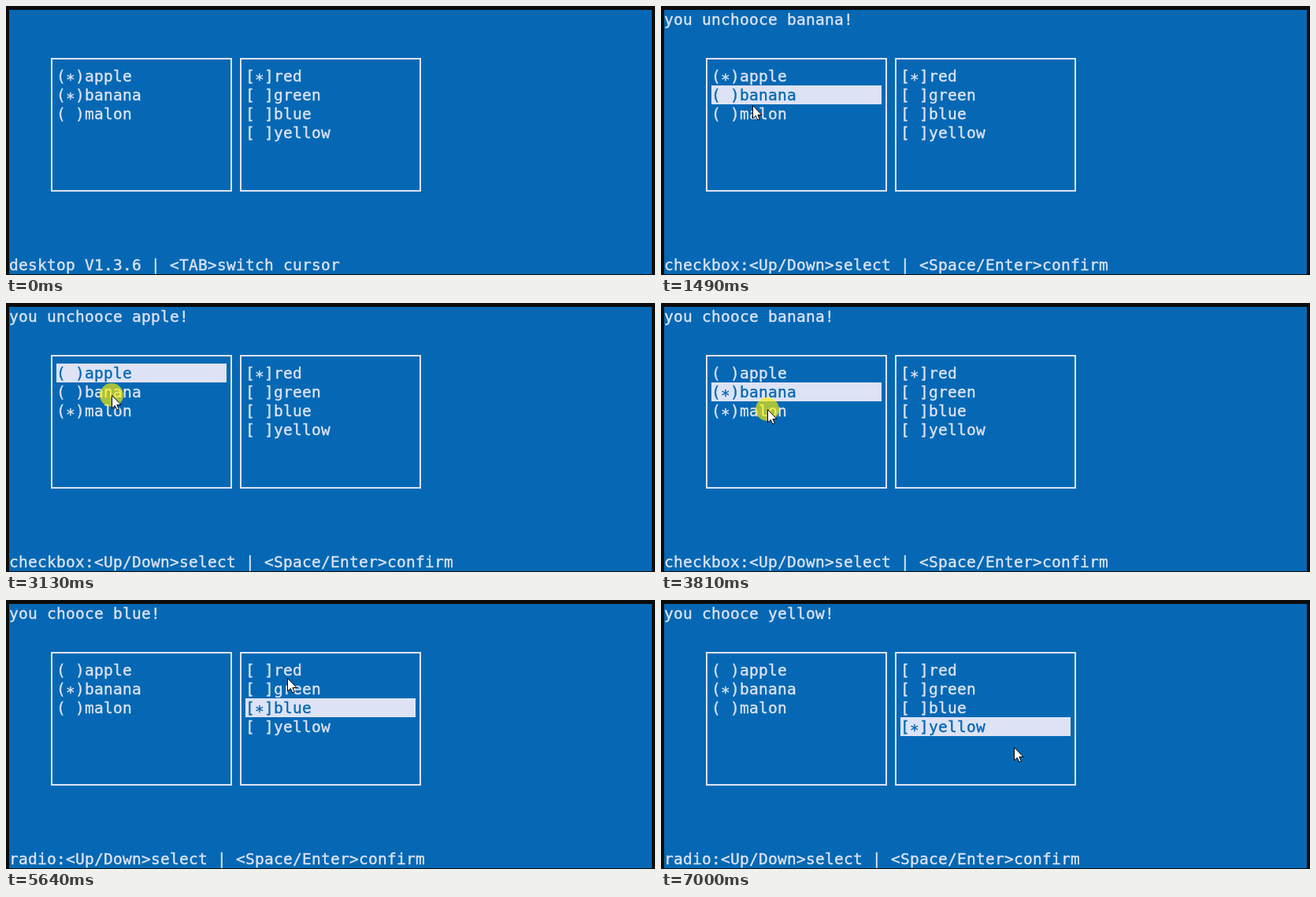
An HTML page with a canvas that plays this animation: 824x342 px, repeating every 7060 ms.

```html
<!DOCTYPE html>
<html lang="en">
<head>
<meta charset="utf-8">
<title>Terminal check list</title>
<style>
html, body { margin: 0; width: 100%; height: 100%; overflow: hidden; background: #0c0c0c; }
canvas { display: block; }
</style>
</head>
<body>
<canvas id="stage" width="824" height="342"></canvas>
<script>
const ctx = document.getElementById('stage').getContext('2d');
const LOOP = 7060, TICK = 66, CELL = 12, ROW = 24;
const BLUE = '#0668b4', INK = '#dde3f5';
const FRUITS = ['apple', 'banana', 'malon'];
const COLORS = ['red', 'green', 'blue', 'yellow'];

// The pointer arrives at x, presses, and the item reacts a little later
const REACT = 200, PRESS = 60;
const picks = [
  { item: 'banana', x: 113, arrive: 950, press: 1220 },
  { item: 'malon', x: 119, arrive: 1620, press: 1890 },
  { item: 'apple', x: 134, arrive: 2480, press: 2550 },
  { item: 'banana', x: 134, arrive: 2890, press: 3130 },
  { item: 'malon', x: 135, arrive: 3660, press: 3810 },
  { item: 'blue', x: 354, arrive: 4690, press: 4960 },
  { item: 'red', x: 357, arrive: 5640, press: 5710 },
  { item: 'green', x: 360, arrive: 6040, press: 6140 },
  { item: 'yellow', x: 368, arrive: 6450, press: 6660 }
];
const START = 270, ENTRY = { x: 604, y: 336 };
const EXIT = { x: 448, y: 187, arrive: 7000, press: LOOP };

const ease = p => p * p * (3 - 2 * p);
const rowOf = item => Math.max(FRUITS.indexOf(item), COLORS.indexOf(item));
const pressY = item => 99 + 18 * rowOf(item);

// Eased travel between presses, advancing in ticks
function pointerAt(t) {
  if (t < START) return null;
  let { x, y } = ENTRY, leave = START;
  for (const stop of [...picks, EXIT]) {
    if (t < leave) break;
    const steps = Math.floor((stop.arrive - leave) / TICK) + 1;
    const step = Math.floor((t - leave) / TICK) + 1;
    const p = ease(Math.min(1, step / steps));
    x += (stop.x - x) * p;
    y += ((stop.y ?? pressY(stop.item)) - y) * p;
    leave = stop.press + REACT;
  }
  return [Math.round(x), Math.round(y)];
}

function stateAt(t) {
  const state = {
    checked: new Set(['apple', 'banana']), radio: 'red', active: '',
    message: '', status: 'desktop V1.3.6 | <TAB>switch cursor'
  };
  for (const { item, press } of picks) {
    if (t < press + REACT) break;
    const isFruit = FRUITS.includes(item);
    let verb = 'chooce';
    if (!isFruit) state.radio = item;
    else if (state.checked.delete(item)) verb = 'unchooce';
    else state.checked.add(item);
    state.active = item;
    state.message = `you ${verb} ${item}!`;
    state.status = (isFruit ? 'checkbox' : 'radio') +
      ':<Up/Down>select | <Space/Enter>confirm';
  }
  return state;
}

function print(text, x, row, color = INK) {
  const base = 5 + row * ROW + 19;
  ctx.fillStyle = ctx.strokeStyle = color;
  ctx.lineWidth = 0.4;
  [...text].forEach((ch, i) => {
    const y = ch === '*' ? base + 4 : base;
    ctx.fillText(ch, x + i * CELL, y);
    ctx.strokeText(ch, x + i * CELL, y);
  });
}

function drawList(x, items, marks, isOn, active) {
  ctx.strokeStyle = INK;
  ctx.lineWidth = 2;
  ctx.strokeRect(x - 6, 67, 228, 168);
  items.forEach((item, i) => {
    const row = 3 + i, lit = item === active;
    if (lit) {
      ctx.fillStyle = INK;
      ctx.fillRect(x, 5 + row * ROW, 18 * CELL, ROW);
    }
    const mark = isOn(item) ? '*' : ' ';
    print(marks[0] + mark + marks[1] + item, x, row, lit ? BLUE : INK);
  });
}

const ARROW = new Path2D('M.5 .5V17L4.3 13.5 6.8 19 9.3 18 6.9 12.5H12Z');

function drawPointer(x, y) {
  ctx.save();
  ctx.translate(x, y);
  ctx.fillStyle = '#fff';
  ctx.fill(ARROW);
  ctx.strokeStyle = '#000';
  ctx.lineWidth = 1;
  ctx.stroke(ARROW);
  ctx.restore();
}

function drawPress(x, y) {
  ctx.fillStyle = 'rgba(255, 240, 0, 0.65)';
  ctx.beginPath();
  ctx.arc(x, y, 15, 0, Math.PI * 2);
  ctx.fill();
}

function draw(t) {
  const state = stateAt(t);
  ctx.fillStyle = '#0c0c0c';
  ctx.fillRect(0, 0, 824, 342);
  ctx.fillStyle = BLUE;
  ctx.fillRect(4, 5, 816, 336);

  ctx.font = '19.5px "DejaVu Sans Mono", "Noto Sans Mono", monospace';
  print(state.message, 4, 0);
  drawList(64, FRUITS, '()', item => state.checked.has(item), state.active);
  drawList(304, COLORS, '[]', item => state.radio === item, state.active);
  print(state.status, 4, 13);

  const pos = pointerAt(t);
  if (!pos) return;
  if (picks.some(({ press }) => t >= press && t < press + PRESS)) drawPress(...pos);
  drawPointer(...pos);
}

const began = performance.now();
function frame() {
  draw((performance.now() - began) % LOOP);
  requestAnimationFrame(frame);
}
frame();
</script>
</body>
</html>
```
